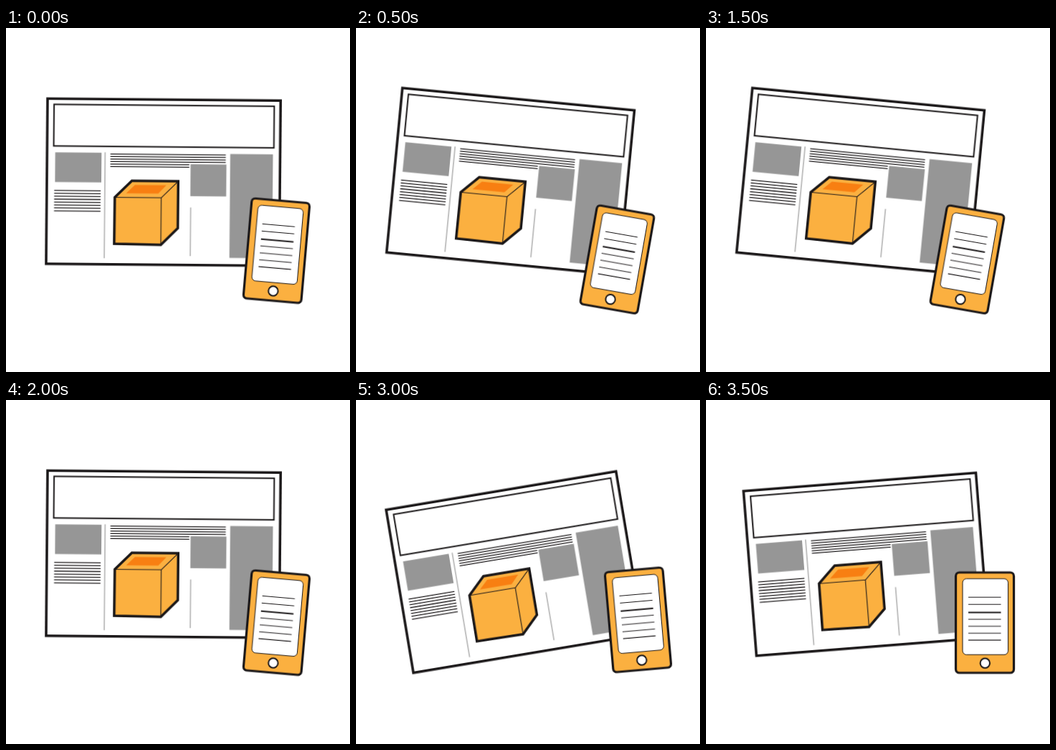
These frames come from a looping animation (480 px wide and 480 px high, 4 s). An HTML page:

```html
<!DOCTYPE html>
<html lang="en">
<head>
<meta charset="utf-8">
<title>Page and phone</title>
<style>
  html, body { margin: 0; width: 100%; height: 100%; overflow: hidden; background: #fff; }
  svg { display: block; width: 100vw; height: 100vh; }
  #art { transform-origin: 0 0; }
  .ink { stroke: #1a1718; fill: none; }
  .white { fill: #fff; }
  .grey { fill: #969696; }
  .amber { fill: #fbb040; }
</style>
</head>
<body>
<svg viewBox="0 0 480 480">
  <g id="art">
    <rect class="ink white" y=".3" width="325.2" height="230.5" stroke-width="3.5"/>
    <rect class="ink" x="9.2" y="8.3" width="307.2" height="58" stroke-width="2"/>
    <g class="grey">
      <rect x="11.4" y="75.2" width="64.6" height="41.4"/>
      <rect x="200.4" y="90.2" width="50" height="44.5"/>
      <rect x="255.6" y="75.4" width="59.6" height="145"/>
    </g>
    <path id="copy" class="ink" stroke-width="1.3"/>
    <path d="M81 74.5V222.3M201 150.5V218.3" stroke="#858585"/>
    <g stroke-linejoin="miter">
      <path class="ink amber" stroke-width="3.5" d="M95 137.3L118.6 114.1H183.3V179.6L159.8 203L94.7 202Z"/>
      <path fill="#f87f12" d="M123 119.8H166.8L155.6 131.6H110.8Z"/>
      <path class="ink" stroke-width="1.1" d="M95 137.3H159.8V203M159.8 137.3L183.3 114.1"/>
    </g>
    <g transform="translate(321.3 209.7) rotate(4.5)">
      <rect class="ink amber" x="-40.5" y="-70" width="81" height="140" rx="5" stroke-width="3.2"/>
      <rect class="ink white" x="-31" y="-61.3" width="63.5" height="106" rx="5.5" stroke-width="1"/>
      <path id="notes" class="ink" stroke-width="1.1"/>
      <path class="ink" d="M-23 -14.3H22.5" stroke-width="2"/>
      <circle class="ink white" cx=".3" cy="56.5" r="6.7" stroke-width="2"/>
    </g>
  </g>
</svg>
<script>
  const $ = id => document.getElementById(id);

  // Stack of horizontal rules
  const rules = (x1, x2, y, gap, count) =>
    Array.from({ length: count }, (_, i) => `M${x1} ${y + i * gap}H${x2}`).join('');

  $('copy').setAttribute('d',
    rules(10.4, 75.2, 128.3, 4.07, 8) +
    rules(88.4, 249.4, 76.9, 3.5, 4) +
    rules(88.4, 198.6, 90.9, 3.5, 2));
  $('notes').setAttribute('d',
    rules(-23, 22.5, -35.5, 10, 2) + rules(-23, 22.5, -4.7, 9.7, 4));

  // Page corner x, y and tilt in degrees
  const level = [58, 98.2, 0.5];
  const right = [64.8, 83.4, 5.5];
  const farRight = [86.7, 79.1, 10.5];
  const left = [52.3, 126.8, -4.5];
  const farLeft = [42, 153, -9.5];
  const poses = [level, right, farRight, right, level, left, farLeft, left];

  const frames = [...poses, level].map(([x, y, a], i) => ({
    offset: i / poses.length,
    transform: `translate(${x}px, ${y}px) rotate(${a}deg)`,
    easing: 'step-end'
  }));
  $('art').animate(frames, { duration: 4000, iterations: Infinity });
</script>
</body>
</html>
```
